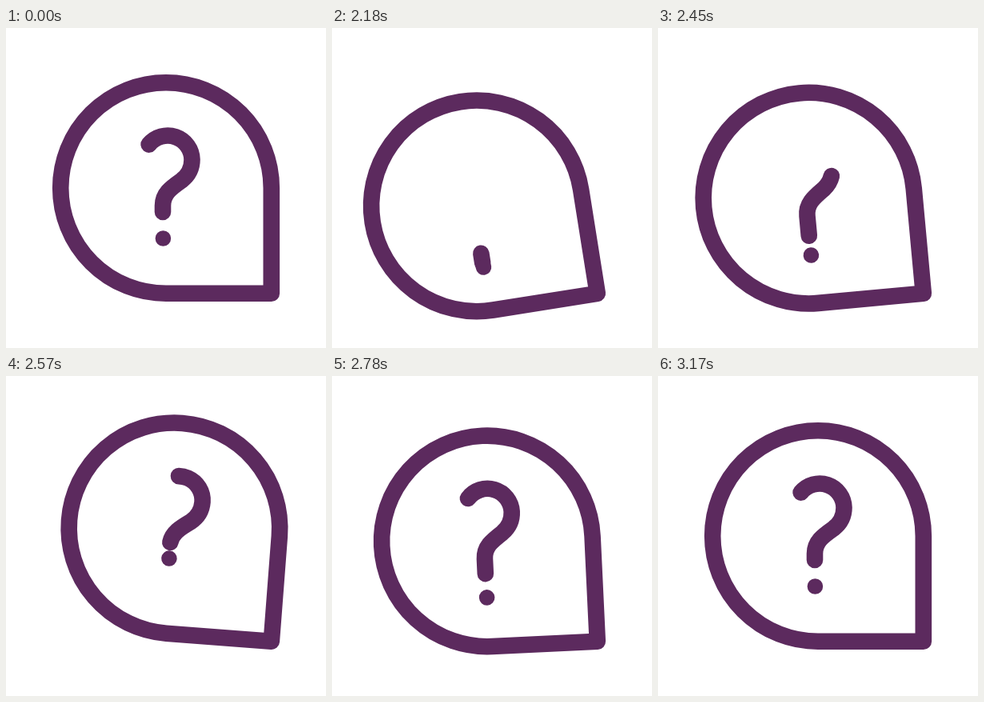
Write an HTML page that moves like this. It is 400 by 400 pixels and loops after 3.23 s.

```html
<!DOCTYPE html>
<html lang="en">
<head>
<meta charset="utf-8">
<title>Question bubble</title>
<style>
  html, body { margin: 0; width: 100%; height: 100%; overflow: hidden; background: #fff; }
  svg { display: block; width: 100%; height: 100%; }
  path { fill: none; stroke: #5c2a5e; stroke-width: 20.6; stroke-linejoin: round; stroke-linecap: round; }
  circle { fill: #5c2a5e; }
</style>
</head>
<body>
<svg viewBox="0 0 400 400">
  <g id="bubble">
    <path d="M331.8 331.8V200A131.8 131.8 0 1 0 200 331.8Z"/>
    <path id="hook" d="M178.6 145.6A30.4 30.4 0 0 1 232.5 164.5C232.5 175 228 184 219.5 190.5C206 200 196 207 196 222V300"/>
    <circle id="dot" cx="196.4" cy="263" r="9.8"/>
  </g>
</svg>
<script>
const LOOP = 3230, REST = 2000, STEP = 30, LAST = 39;
const [bubble, hook, dot] = ['bubble', 'hook', 'dot'].map(id => document.getElementById(id));

const smooth = x => x * x * (3 - 2 * x);
const out = x => 1 - (1 - x) ** 2;
const mix = x => (smooth(x) + out(x)) / 2;

// The hook slides down its own track, which runs on below the stem at y = 229.5.
const stem = hook.getTotalLength() - (300 - 229.5);
const sunk = 49;

// Keys: [step, value, easing into this key]
const tilt = [[0, 0], [8.2, -11], [11.6, -11], [20, 5], [26.4, -2.8], [32.5, 1], [LAST, 0]];
const tail = [[0, 0], [8.7, stem + sunk, out], [10.2, stem + sunk], [23.8, 0, out]];
const head = [[0, 0], [8.5, sunk, mix], [9.8, sunk], [20.1, -14], [26.4, 11], [32.5, -3], [LAST, 0]];
const drop = [[0, 0], [8.2, 16, mix], [13.2, 16], [19.9, -27], [26.4, 7.8], [32.5, -3], [LAST, 0]];

function at(keys, k) {
  const i = keys.findIndex(key => key[0] > k);
  if (i < 0) return keys[keys.length - 1][1];
  const [k0, v0] = keys[i - 1], [k1, v1, ease = smooth] = keys[i];
  return v0 + (v1 - v0) * ease((k - k0) / (k1 - k0));
}

function draw(ms) {
  const k = Math.min(LAST, Math.max(0, Math.floor((ms % LOOP - REST) / STEP)));
  const from = at(tail, k);
  const length = Math.max(0.01, stem + at(head, k) - from);
  bubble.setAttribute('transform', `rotate(${at(tilt, k)} 331.8 331.8)`);
  hook.setAttribute('stroke-dasharray', `${length} 999`);
  hook.setAttribute('stroke-dashoffset', -from);
  dot.setAttribute('cy', 263 + at(drop, k));
}

const start = performance.now();
function tick() {
  draw(performance.now() - start);
  requestAnimationFrame(tick);
}
tick();
</script>
</body>
</html>
```
